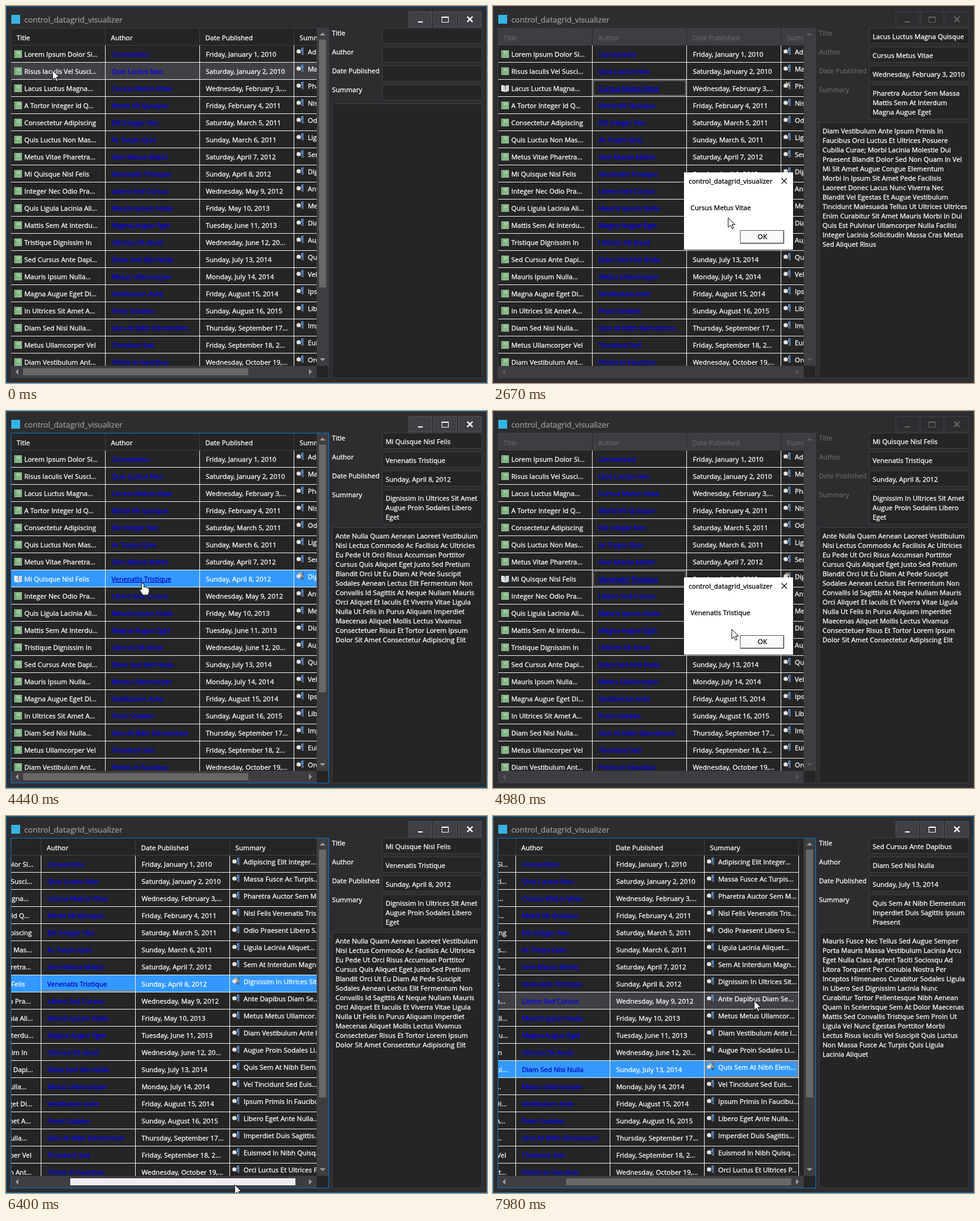
Animation of 816x639 px, one loop 8 s. Source, as an HTML page with a canvas:

```html
<!DOCTYPE html>
<html lang="en">
<head>
<meta charset="utf-8">
<title>Datagrid visualizer</title>
<style>
  html, body { margin: 0; width: 100%; height: 100%; overflow: hidden; background: #2d2d30; }
  canvas { display: block; }
</style>
</head>
<body>
<canvas id="stage" width="816" height="639"></canvas>
<script>
const ctx = document.getElementById('stage').getContext('2d');
const LOOP = 8000, ROW_H = 29, TOP = 67, RIGHT = 527, BOTTOM = 610;
const COLORS = {
  window: '#2d2d30', panel: '#252526', line: '#3f3f46', edge: '#54545c', accent: '#007acc',
  text: '#fff', dim: '#656565', caption: '#999', link: '#0000ff',
  hover: '#3f3f46', select: '#3399ff', focus: '#ca6a1c', track: '#3e3e42', thumb: '#686868'
};
const font = size => `${size}px "Open Sans", "Noto Sans", sans-serif`;
const BODY = font(11.45);

const books = `Lorem Ipsum Dolor Si...|Consectetur|Friday, January 1, 2010|Adipiscing Elit Integer...
Risus Iaculis Vel Susci...|Quis Luctus Non|Saturday, January 2, 2010|Massa Fusce Ac Turpis...
Lacus Luctus Magna...|Cursus Metus Vitae|Wednesday, February 3,...|Pharetra Auctor Sem M...
A Tortor Integer Id Q...|Morbi Mi Quisque|Friday, February 4, 2011|Nisl Felis Venenatis Tris...
Consectetur Adipiscing|Elit Integer Nec|Saturday, March 5, 2011|Odio Praesent Libero S...
Quis Luctus Non Mas...|Ac Turpis Quis|Sunday, March 6, 2011|Ligula Lacinia Aliquet...
Metus Vitae Pharetra...|Sem Massa Mattis|Saturday, April 7, 2012|Sem At Interdum Magn...
Mi Quisque Nisl Felis|Venenatis Tristique|Sunday, April 8, 2012|Dignissim In Ultrices Sit...
Integer Nec Odio Pra...|Libero Sed Cursus|Wednesday, May 9, 2012|Ante Dapibus Diam Se...
Quis Ligula Lacinia Ali...|Mauris Ipsum Nulla|Friday, May 10, 2013|Metus Metus Ullamcor...
Mattis Sem At Interdu...|Magna Augue Eget|Tuesday, June 11, 2013|Diam Vestibulum Ante I...
Tristique Dignissim In|Ultrices Sit Amet|Wednesday, June 12, 20...|Augue Proin Sodales Li...
Sed Cursus Ante Dapi...|Diam Sed Nisi Nulla|Sunday, July 13, 2014|Quis Sem At Nibh Elem...
Mauris Ipsum Nulla...|Metus Ullamcorper|Monday, July 14, 2014|Vel Tincidunt Sed Euis...
Magna Augue Eget Di...|Vestibulum Ante|Friday, August 15, 2014|Ipsum Primis In Faucibu...
In Ultrices Sit Amet A...|Proin Sodales|Sunday, August 16, 2015|Libero Eget Ante Nulla...
Diam Sed Nisi Nulla...|Sem At Nibh Elementum|Thursday, September 17...|Imperdiet Duis Sagittis...
Metus Ullamcorper Vel|Tincidunt Sed|Friday, September 18, 2...|Euismod In Nibh Quisq...
Diam Vestibulum Ant...|Primis In Faucibus|Wednesday, October 19,...|Orci Luctus Et Ultrices P...`
  .split('\n').map(row => row.split('|'));

const details = {
  2: {
    fields: ['Lacus Luctus Magna Quisque', 'Cursus Metus Vitae', 'Wednesday, February 3, 2010'],
    summary: 'Pharetra Auctor Sem Massa|Mattis Sem At Interdum|Magna Augue Eget',
    body: 'Diam Vestibulum Ante Ipsum Primis In|Faucibus Orci Luctus Et Ultrices Posuere|Cubilia Curae; Morbi Lacinia Molestie Dui|Praesent Blandit Dolor Sed Non Quam In Vel|Mi Sit Amet Augue Congue Elementum|Morbi In Ipsum Sit Amet Pede Facilisis|Laoreet Donec Lacus Nunc Viverra Nec|Blandit Vel Egestas Et Augue Vestibulum|Tincidunt Malesuada Tellus Ut Ultrices Ultrices|Enim Curabitur Sit Amet Mauris Morbi In Dui|Quis Est Pulvinar Ullamcorper Nulla Facilisi|Integer Lacinia Sollicitudin Massa Cras Metus|Sed Aliquet Risus'
  },
  7: {
    fields: ['Mi Quisque Nisl Felis', 'Venenatis Tristique', 'Sunday, April 8, 2012'],
    summary: 'Dignissim In Ultrices Sit Amet|Augue Proin Sodales Libero|Eget',
    body: 'Ante Nulla Quam Aenean Laoreet Vestibulum|Nisi Lectus Commodo Ac Facilisis Ac Ultricies|Eu Pede Ut Orci Risus Accumsan Porttitor|Cursus Quis Aliquet Eget Justo Sed Pretium|Blandit Orci Ut Eu Diam At Pede Suscipit|Sodales Aenean Lectus Elit Fermentum Non|Convallis Id Sagittis At Neque Nullam Mauris|Orci Aliquet Et Iaculis Et Viverra Vitae Ligula|Nulla Ut Felis In Purus Aliquam Imperdiet|Maecenas Aliquet Mollis Lectus Vivamus|Consectetuer Risus Et Tortor Lorem Ipsum|Dolor Sit Amet Consectetur Adipiscing Elit'
  },
  12: {
    fields: ['Sed Cursus Ante Dapibus', 'Diam Sed Nisi Nulla', 'Sunday, July 13, 2014'],
    summary: 'Quis Sem At Nibh Elementum|Imperdiet Duis Sagittis Ipsum|Praesent',
    body: 'Mauris Fusce Nec Tellus Sed Augue Semper|Porta Mauris Massa Vestibulum Lacinia Arcu|Eget Nulla Class Aptent Taciti Sociosqu Ad|Litora Torquent Per Conubia Nostra Per|Inceptos Himenaeos Curabitur Sodales Ligula|In Libero Sed Dignissim Lacinia Nunc|Curabitur Tortor Pellentesque Nibh Aenean|Quam In Scelerisque Sem At Dolor Maecenas|Mattis Sed Convallis Tristique Sem Proin Ut|Ligula Vel Nunc Egestas Porttitor Morbi|Lectus Risus Iaculis Vel Suscipit Quis Luctus|Non Massa Fusce Ac Turpis Quis Ligula|Lacinia Aliquet'
  }
};

// Pointer waypoints: time, x, y.
const path = [
  [0, 79, 109], [210, 79, 109], [600, 146, 97], [990, 212, 84], [1120, 212, 84],
  [1280, 209, 113], [1510, 209, 113], [1750, 207, 142], [2070, 207, 142],
  [2830, 424, 387], [2870, 424, 387], [2950, 436, 394], [3170, 436, 394],
  [3670, 290, 330], [3950, 238, 297], [4110, 232, 292], [4440, 232, 292],
  [4980, 405, 370], [5150, 432, 390], [5290, 432, 390], [5690, 308, 548],
  [5740, 313, 566], [5940, 308, 619], [6120, 308, 621], [6400, 388, 625],
  [6560, 406, 626], [6920, 415, 627], [7440, 443, 430], [7640, 443, 430],
  [7980, 443, 313], [8000, 443, 313]
];

function slope(i, axis) {
  const a = path[i - 1], b = path[i], c = path[i + 1];
  if (!a || !c) return 0;
  const still = (p, q) => p[1] === q[1] && p[2] === q[2];
  return still(a, b) || still(b, c) ? 0 : (c[axis] - a[axis]) / (c[0] - a[0]);
}

function pointer(t) {
  t = Math.max(0, t);
  const i = Math.max(0, path.findIndex(p => p[0] > t) - 1);
  const a = path[i], b = path[i + 1], span = b[0] - a[0], u = (t - a[0]) / span;
  const at = k => {
    const d0 = slope(i, k) * span, d1 = slope(i + 1, k) * span;
    return a[k] + u * (d0 + u * (3 * (b[k] - a[k]) - 2 * d0 - d1 + u * (2 * (a[k] - b[k]) + d0 + d1)));
  };
  return { x: Math.round(at(1)), y: Math.round(at(2)) };
}

const between = (v, a, b) => v >= a && v < b;

function stateAt(t) {
  const pos = pointer(t), late = pointer(t - 50);
  const dialog = between(t, 2070, 3170) || between(t, 4480, 5290);
  const dragging = between(t, 6120, 6920);
  const shift = t < 6120 ? 0 : dragging ? Math.min(95, Math.max(0, pos.x - 308)) : 95;
  const scroll = Math.round(shift * 130 / 95);
  const selected = t < 2030 ? -1 : t < 4440 ? 2 : t < 7480 ? 7 : 12;
  const inGrid = !dialog && !dragging && between(late.y, TOP, BOTTOM) && between(late.x, 9, RIGHT);
  const hover = inGrid ? Math.floor((late.y - TOP) / ROW_H) : -1;
  const gx = late.x + scroll;
  ctx.font = BODY;
  const overLink = hover >= 0 && between(gx, 175, 312);
  const hand = overLink && gx < 183 + ctx.measureText(books[hover][1]).width;
  // The clicked link stays underlined while its dialog is open.
  const underlined = dialog ? selected : overLink ? hover : -1;
  return { t, pos, dialog, dragging, shift, scroll, selected, hover, underlined, hand };
}

function fill(x, y, w, h, color) {
  ctx.fillStyle = color;
  ctx.fillRect(x, y, w, h);
}

function frame(x, y, w, h, color, width = 1) {
  ctx.strokeStyle = color;
  ctx.lineWidth = width;
  ctx.strokeRect(x + width / 2, y + width / 2, w - width, h - width);
}

function box(x, y, w, h, bg = COLORS.panel, border = COLORS.line) {
  fill(x, y, w, h, bg);
  frame(x, y, w, h, border);
}

// A hairline outline gives the small type its full contrast.
function text(str, x, y, color = COLORS.text, face = BODY) {
  ctx.font = face;
  ctx.fillStyle = ctx.strokeStyle = color;
  ctx.lineWidth = 0.3;
  ctx.fillText(str, x, y);
  ctx.strokeText(str, x, y);
}

function stroke(color, width, ...pts) {
  ctx.strokeStyle = color;
  ctx.lineWidth = width;
  ctx.beginPath();
  pts.forEach(([x, y]) => ctx.lineTo(x, y));
  ctx.stroke();
}

function shape(color, ...pts) {
  ctx.fillStyle = color;
  ctx.beginPath();
  pts.forEach(([x, y]) => ctx.lineTo(x, y));
  ctx.closePath();
  ctx.fill();
}

function cross(x, y, r, color, width) {
  stroke(color, width, [x - r, y - r], [x + r, y + r]);
  stroke(color, width, [x + r, y - r], [x - r, y + r]);
}

function drawWindow({ dialog }) {
  fill(0, 0, 816, 639, COLORS.window);
  frame(0, 0, 816, 639, dialog ? COLORS.line : COLORS.accent);
  fill(9, 15, 15, 15, '#35b4e4');
  text('control_datagrid_visualizer', 31, 28, COLORS.caption, font(13.4));
  const ink = dialog ? COLORS.dim : '#fff';
  for (const x of [683, 725, 767])
    box(x, 9, 40, 27, dialog ? COLORS.window : COLORS.line, dialog ? COLORS.line : COLORS.edge);
  fill(699, 26, 8, 2, ink);
  frame(739, 18, 12, 10, ink);
  fill(739, 18, 12, 2, ink);
  cross(787, 22.5, 4.5, ink, 2.4);
}

function drawBook(x, y, open) {
  if (open) {
    shape('#f4f4f0', [x, y + 1], [x + 6, y + 2], [x + 7, y + 13], [x, y + 11]);
    shape('#dfe3e8', [x + 7, y + 2], [x + 13, y + 1], [x + 13, y + 11], [x + 7, y + 13]);
    fill(x + 6.5, y + 2, 1, 11, '#7b8794');
    for (const d of [4, 6, 8]) {
      fill(x + 2, y + d, 3, 1, '#b4bcc4');
      fill(x + 9, y + d, 3, 1, '#b4bcc4');
    }
    return;
  }
  box(x, y, 13, 13, '#83b883', '#94bd94');
  fill(x + 1, y + 1, 2, 11, '#71a474');
  fill(x + 4, y + 3, 6, 1, '#c4dfc2');
  fill(x + 4, y + 5, 6, 1, '#b4d8b2');
}

function drawNote(x, y, open) {
  fill(x + 10, y + 1, 3, 13, '#3f6ea5');
  stroke('#7b5940', 2, [x + 6, y + 8], [x + 11, y + 13]);
  stroke('#9dbfe0', 1, [x + 9.5, y + 2], [x + 9.5, y + 8]);
  ctx.fillStyle = '#dfe1e3';
  ctx.beginPath();
  ctx.arc(x + 4.5, y + 8, 3.6, 0, Math.PI * 2);
  ctx.fill();
  if (open) stroke('#e0b060', 2, [x + 5, y + 2], [x + 12, y + 9]);
}

function drawFocus({ t, selected, dialog }, y) {
  const x = selected === 12 ? 490 : 170;
  if (dialog) {
    ctx.setLineDash([1, 1]);
    frame(x, y + 1, 157, 26, '#fff');
    ctx.setLineDash([]);
  } else if (selected === 7) {
    if (t >= 6120) fill(x, y + 27, 157, 1, COLORS.focus);
  } else {
    frame(x, y + 1, 157, 27, COLORS.focus, 1);
  }
}

function drawRow(i, state) {
  const y = TOP + i * ROW_H, [title, author, date, summary] = books[i];
  const selected = state.selected === i, lit = selected && !state.dialog;
  if (lit) fill(9, y, 639, 28, COLORS.select);
  else if (state.hover === i) fill(9, y, 639, 28, COLORS.hover);
  drawBook(14, y + 8, selected);
  text(title, 31, y + 19);
  const ink = lit ? '#0000c0' : COLORS.link;
  text(author, 179, y + 19, ink);
  if (state.underlined === i)
    fill(179, y + 20, Math.round(ctx.measureText(author).width), 1, ink);
  text(date, 339, y + 19);
  drawNote(492, y + 2, selected);
  text(summary, 512, y + 15);
  fill(9, y + 28, 640, 1, '#f0f0f0');
  for (const x of [168, 328, 488, 648]) fill(x, y, 1, 29, '#f0f0f0');
  if (selected) drawFocus(state, y);
}

function drawGrid(state) {
  const { dialog, scroll } = state;
  fill(9, 38, 538, 592, COLORS.panel);
  ctx.save();
  ctx.beginPath();
  ctx.rect(9, 38, RIGHT - 9, BOTTOM - 38);
  ctx.clip();
  ctx.translate(-scroll, 0);
  if (dialog) fill(9, 38, 640, 29, COLORS.track);
  ['Title', 'Author', 'Date Published', 'Summary'].forEach((name, i) => {
    text(name, 18 + i * 160, 58, dialog ? COLORS.dim : '#fff');
    fill(168 + i * 160, 38, 1, 29, dialog ? COLORS.panel : COLORS.line);
  });
  fill(9, 66, 640, 1, COLORS.line);
  books.forEach((_, i) => drawRow(i, state));
  ctx.restore();
  drawScrollbars(state);
  frame(8, 37, 540, 594, state.selected >= 0 && !dialog ? COLORS.accent : COLORS.line);
}

function drawScrollbars({ dialog, dragging, shift, pos }) {
  const arrow = dialog ? '#59595c' : '#999';
  fill(RIGHT, 38, 20, 572, COLORS.track);
  fill(9, BOTTOM, 518, 20, COLORS.track);
  shape(arrow, [532, 50], [542, 50], [537, 45]);
  shape(arrow, [532, 597], [542, 597], [537, 602]);
  shape(arrow, [21, 615], [21, 625], [16, 620]);
  shape(arrow, [514, 615], [514, 625], [519, 620]);
  if (dialog) return;
  fill(531, 57, 12, 420, COLORS.thumb);
  const over = between(pos.y, 611, 630) && between(pos.x, 29 + shift, 411 + shift);
  fill(29 + shift, 614, 382, 12, dragging ? '#efebef' : over ? '#9e9e9e' : COLORS.thumb);
}

function drawDetails({ selected, dialog }) {
  const book = details[selected];
  ['Title', 'Author', 'Date Published', 'Summary'].forEach((label, i) => {
    const y = 37 + i * 32;
    text(label, 553, y + 13, dialog ? COLORS.dim : '#fff');
    box(638, y, 170, i === 3 && book ? 59 : 27);
    if (book && i < 3) text(book.fields[i], 644, y + 19);
  });
  const top = book ? 197 : 165;
  box(553, top, 255, 631 - top);
  if (!book) return;
  book.summary.split('|').forEach((line, i) => text(line, 644, 152 + i * 16));
  book.body.split('|').forEach((line, i) => text(line, 559, 216 + i * 16));
}

function drawDialog({ selected }) {
  ctx.save();
  ctx.shadowColor = 'rgba(0,0,0,.2)';
  ctx.shadowBlur = 12;
  ctx.shadowOffsetY = 3;
  fill(324, 282, 185, 131, '#fff');
  ctx.restore();
  text('control_datagrid_visualizer', 332, 301, '#000');
  cross(494, 296.5, 4.5, '#000', 1.1);
  text(books[selected][1], 335, 346, '#000');
  box(419, 380, 75, 23, '#fafafa', '#555');
  stroke('#fff', 1, [420.5, 401], [420.5, 381.5], [492, 381.5]);
  stroke('#888', 1, [421, 401.5], [492.5, 401.5], [492.5, 382]);
  text('OK', 449, 395, '#000');
}

function drawPointer({ pos, hand }) {
  ctx.save();
  ctx.translate(pos.x, pos.y);
  ctx.fillStyle = '#fff';
  ctx.strokeStyle = '#000';
  ctx.lineWidth = 1;
  ctx.lineJoin = 'round';
  const outline = new Path2D(hand
    ? 'M-2 1 Q0 -1 2 1 V7 Q4 5 5 7 Q7 6 8 8 Q10 7 11 10 V14 L9 20 H0 L-5 12 Q-6 9 -3 10 L-2 11 Z'
    : 'M0 0 V16 L4 12.5 L6.5 18.5 L9 17.5 L6.5 11.5 H11.5 Z');
  ctx.fill(outline);
  ctx.stroke(outline);
  ctx.restore();
}

function render(now) {
  const state = stateAt(now % LOOP);
  drawWindow(state);
  drawGrid(state);
  drawDetails(state);
  if (state.dialog) drawDialog(state);
  drawPointer(state);
}

let start;
function tick(now) {
  start ??= now;
  render(now - start);
  requestAnimationFrame(tick);
}
render(0);
requestAnimationFrame(tick);
</script>
</body>
</html>
```
